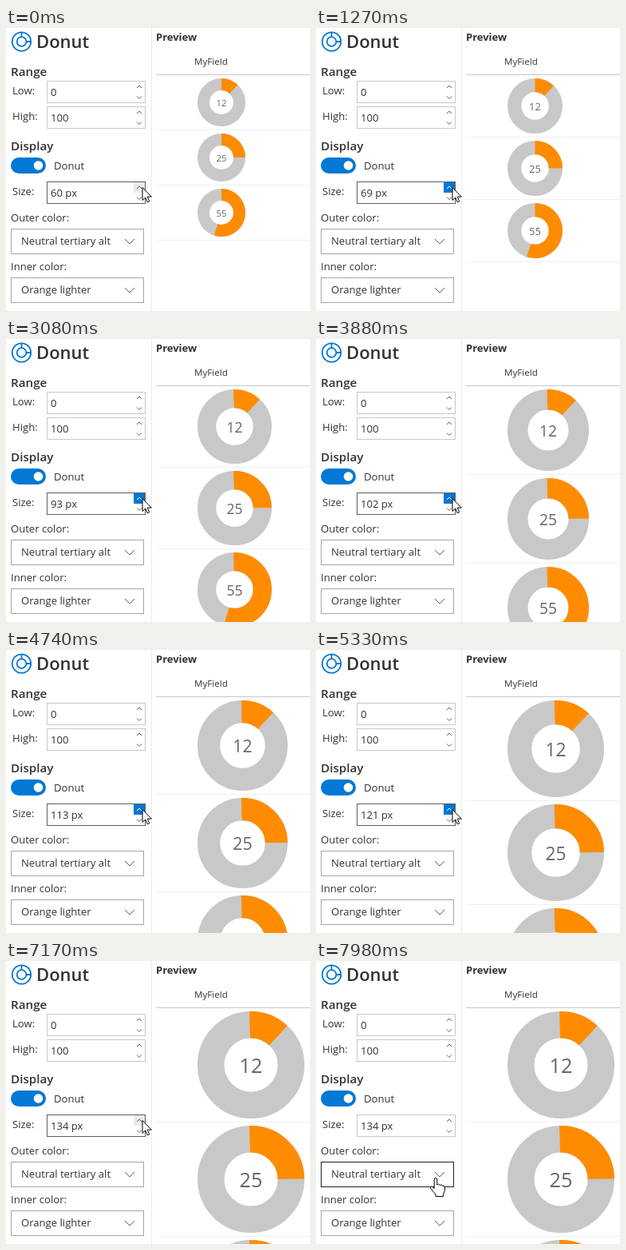
These frames come from a looping animation (381x354 px, 8 s). An HTML page:

```html
<!DOCTYPE html>
<html lang="en">
<head>
<meta charset="utf-8">
<title>Donut settings</title>
<style>
  html, body { margin: 0; width: 381px; height: 354px; overflow: hidden; background: #fff; }
  svg { display: block; font: 13.1px "Open Sans", "Noto Sans", sans-serif; fill: #323130; }
  .title { font-size: 22px; font-weight: 600; }
  .head { font-size: 15.2px; font-weight: 600; }
  .preview { font-size: 13px; font-weight: 700; }
  .column { font-size: 11.6px; }
  .box { fill: #fff; stroke: #c8c8c8; }
  .select { stroke: #a6a6a6; }
  .box.focus { stroke: #605e5c; }
  .box.hover { stroke: #201f1e; }
  .arrow, .caret { fill: none; stroke: #605e5c; }
  .button { fill: none; }
  .button.over { fill: #eaeaea; }
  .button.down { fill: #0078d4; }
  .down + .arrow { stroke: #fff; }
  .icon { fill: none; stroke: #0078d4; stroke-width: 1.8; }
  .rule { shape-rendering: crispEdges; }
  .ring { fill: none; stroke: #c8c8c8; stroke-width: 15; }
  .value { stroke: #ff8c00; }
  .number { font-size: 11.3px; fill: #666; text-anchor: middle; }
  .pointer { fill: #fff; stroke: #000; stroke-linejoin: round; }
</style>
</head>
<body>
<svg width="381" height="354" viewBox="0 0 381 354">
  <g class="icon">
    <circle cx="19.5" cy="17" r="11.7"/>
    <circle cx="19.5" cy="17" r="5.8"/>
    <path d="M19.5 5.5v6M25.5 17h6"/>
  </g>
  <text class="title" x="38" y="25">Donut</text>
  <text class="head" x="6" y="60">Range</text>
  <text x="8" y="83">Low:</text>
  <text x="8" y="115">High:</text>
  <text class="head" x="6" y="153">Display</text>
  <rect x="6" y="162" width="44" height="20" rx="10" fill="#0078d4"/>
  <circle cx="40.5" cy="172" r="5.8" fill="#fff"/>
  <text x="60" y="177">Donut</text>
  <text x="8" y="209">Size:</text>
  <text x="6" y="242">Outer color:</text>
  <text x="6" y="303">Inner color:</text>
  <g id="fields"></g>

  <rect class="rule" x="182" width="1" height="354" fill="#eaeaea"/>
  <text class="preview" x="188" y="16">Preview</text>
  <text class="column" x="236" y="46">MyField</text>
  <rect class="rule" x="188" y="58" width="193" height="1" fill="#c8c8c8"/>
  <g id="rows"></g>

  <path id="pointer" class="pointer" d="M.5 .5v16l3.7-3.5 2.5 5.8 2.5-1-2.5-5.7h5.1z"/>
  <path id="hand" class="pointer" d="M-1.8 13V1.8a1.8 1.8 0 0 1 3.6 0V8.5q2-1.6 3.6 .4q2-1 3.4 .8q2.4-.5 2.6 1.8v4.5l-2 4v3h-9.4v-2.4l-6.4-7.8q-.8-2.8 1.8-2.3z"/>
</svg>
<script>
  const LOOP = 8000;
  const $ = id => document.getElementById(id);

  // First tick, last tick and tick count of each run of increments
  const runs = [
    [250, 250, 1], [600, 1370, 10], [1450, 2250, 11], [2300, 3080, 11],
    [3180, 3970, 11], [4050, 4840, 11], [4920, 5720, 11], [5760, 6330, 8]
  ];
  const press = 250, release = 7170;
  const move = { start: 7450, end: 7980, steps: 11, from: [170.5, 199], to: [150, 271.5] };

  const spinner = (y, value, id) => `
    <rect id="${id}Box" class="box" x="51.5" y="${y + .5}" width="123" height="27"/>
    <text id="${id}Text" x="56" y="${y + 19}">${value}</text>
    <rect id="${id}Up" class="button" x="160" y="${y + 1}" width="14" height="13"/>
    <path class="arrow" d="M164 ${y + 9}l3-3 3 3"/>
    <rect id="${id}Down" class="button" x="160" y="${y + 14}" width="14" height="13"/>
    <path class="arrow" d="M164 ${y + 19.5}l3 3 3-3"/>`;

  const select = (y, value, id) => `
    <rect id="${id}Box" class="box select" x="6.5" y="${y + .5}" width="166" height="31"/>
    <text x="19" y="${y + 20}">${value}</text>
    <path class="caret" d="M149 ${y + 13}l6 6 6-6"/>`;

  $("fields").innerHTML =
    spinner(66, "0", "low") + spinner(98, "100", "high") + spinner(192, "60 px", "size") +
    select(251, "Neutral tertiary alt", "outer") + select(312, "Orange lighter", "inner");

  $("rows").innerHTML = [12, 25, 55].map(v => `
    <g class="donut">
      <circle class="ring" cx="30" cy="30" r="22.5"/>
      <circle class="ring value" cx="30" cy="30" r="22.5" pathLength="100"
        stroke-dasharray="${v} ${100 - v}" transform="rotate(-90 30 30)"/>
      <text class="number" x="30" y="34.7">${v}</text>
    </g>
    <rect class="line rule" x="188" width="193" height="1" fill="#f0f0f0"/>`).join("");
  const donuts = document.querySelectorAll(".donut");
  const lines = document.querySelectorAll(".line");

  // Ticks passed by time t in an evenly spaced run
  const ticks = (t, start, end, count) => {
    if (t < start) return 0;
    if (t >= end) return count;
    return 1 + Math.floor((t - start) / (end - start) * (count - 1));
  };

  const sizeAt = t => runs.reduce((size, run) => size + ticks(t, ...run), 60);

  function pointerAt(t) {
    const p = ticks(t, move.start, move.end, move.steps) / move.steps;
    const eased = p * p * (3 - 2 * p);
    return move.from.map((a, i) => a + (move.to[i] - a) * eased);
  }

  function draw(now) {
    const t = now % LOOP;
    const size = sizeAt(t);
    const pitch = size + 9;
    donuts.forEach((d, i) =>
      d.setAttribute("transform", `translate(240 ${63 + i * pitch}) scale(${size / 60})`));
    lines.forEach((l, i) => l.setAttribute("y", 67 + size + i * pitch));
    $("sizeText").textContent = size + " px";

    const [x, y] = pointerAt(t);
    const down = t >= press && t < release;
    const onSelect = y > 251;
    const onButtons = x > 160 && y < 219;
    $("sizeBox").classList.toggle("focus", y < 220);
    $("outerBox").classList.toggle("hover", onSelect);
    $("sizeUp").classList.toggle("down", down);
    $("sizeUp").classList.toggle("over", !down && onButtons && y < 206);
    $("sizeDown").classList.toggle("over", onButtons && y >= 206);

    for (const id of ["pointer", "hand"]) {
      $(id).setAttribute("transform", `translate(${x} ${y})`);
      $(id).style.display = (id === "hand") === onSelect ? "" : "none";
    }
    requestAnimationFrame(draw);
  }
  draw(performance.now());
</script>
</body>
</html>
```
